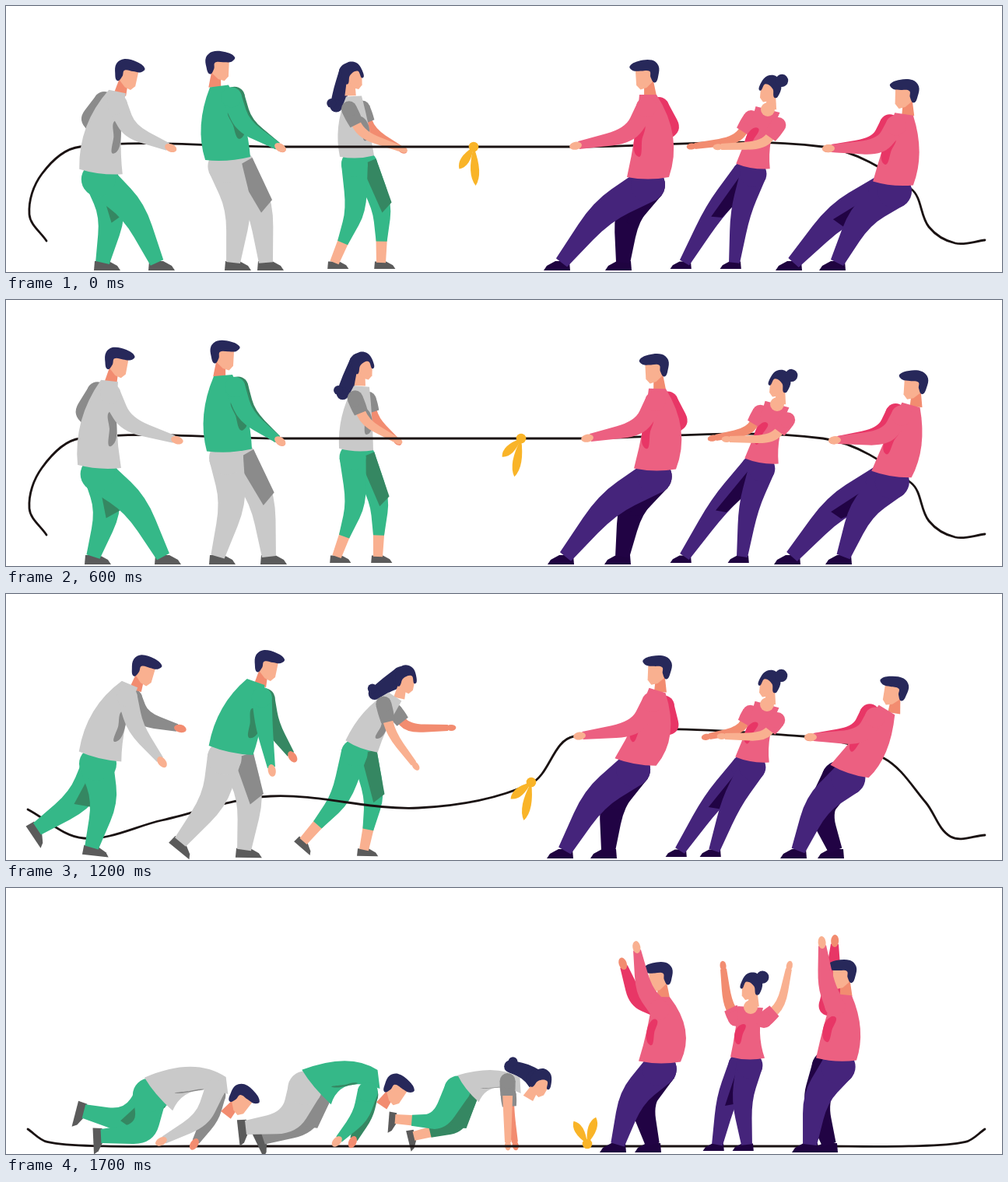
Animation, 1280 px wide and 342 px high, one loop 2.2 s. Source, as an HTML page with a canvas:

```html
<!DOCTYPE html>
<html lang="en">
<head>
<meta charset="utf-8">
<title>Tug of war</title>
<style>
html, body { margin: 0; width: 100%; height: 100%; overflow: hidden; background: #fff; }
canvas { display: block; width: 1280px; height: 342px; }
</style>
</head>
<body>
<canvas id="stage" width="1280" height="342"></canvas>
<script>
const ctx = document.getElementById('stage').getContext('2d');
const LOOP = 2200, GROUND = 330;
const KEYS = [0, 600, 900, 1200, 1400, 1700];
const SKIN = '#f9b090', SKIN_DARK = '#f28c70', HAIR = '#27285a', ROPE = '#1a1212', GOLD = '#f9b428';
const GREEN = '#35b888', GREEN_DARK = '#358762', GRAY = '#c9c9c9', GRAY_DARK = '#8b8b8b';
const PINK = '#ec6081', PINK_DARK = '#e83666', PURPLE = '#45247b', PURPLE_DARK = '#210344';

// ---------- geometry ----------
const mix = (a, b, k) => Array.isArray(a) ? a.map((v, i) => mix(v, b[i], k)) : a + (b - a) * k;
const clamp = v => Math.max(0, Math.min(1, v));
const rad = deg => deg * Math.PI / 180;
const add = (p, v, k = 1) => [p[0] + v[0] * k, p[1] + v[1] * k];
const dist = (p, q) => Math.hypot(q[0] - p[0], q[1] - p[1]) || 1;
const toward = (p, q) => [(q[0] - p[0]) / dist(p, q), (q[1] - p[1]) / dist(p, q)];
const turn = ([x, y]) => [y, -x];
const pairs = flat => flat.flatMap((v, i) => i % 2 ? [] : [[v, flat[i + 1]]]);

function sample(keys, time) {
  let i = KEYS.length - 2;
  while (i && KEYS[i] > time) i--;
  return mix(keys[i], keys[i + 1], (time - KEYS[i]) / (KEYS[i + 1] - KEYS[i]));
}

// ---------- drawing ----------
function fill(color) { ctx.fillStyle = color; ctx.fill(); }

function dot([x, y], r, color) {
  ctx.beginPath();
  ctx.arc(x, y, r, 0, 7);
  fill(color);
}

function polygon(p, color) {
  ctx.beginPath();
  p.forEach(q => ctx.lineTo(...q));
  fill(color);
}

// Smooth line whose handles scale with each chord
function spline(p, closed) {
  const n = p.length;
  const at = i => closed ? p[(i + n) % n] : p[Math.max(0, Math.min(n - 1, i))];
  ctx.beginPath();
  ctx.moveTo(...p[0]);
  for (let i = 0; i < (closed ? n : n - 1); i++) {
    const [a, b, c, d] = [at(i - 1), at(i), at(i + 1), at(i + 2)], reach = dist(b, c) / 3;
    ctx.bezierCurveTo(...add(b, toward(a, c), reach), ...add(c, toward(b, d), -reach), ...c);
  }
}

function blob(p, color) { spline(p, true); fill(color); }

// Quadratic curve from a to c that passes through b
function through(a, b, c) {
  ctx.quadraticCurveTo(2 * b[0] - (a[0] + c[0]) / 2, 2 * b[1] - (a[1] + c[1]) / 2, ...c);
}

// Tapered three-joint shape with a soft bend in the middle
function limb([a, b, c], radii, color) {
  const normals = [turn(toward(a, b)), turn(toward(a, c)), turn(toward(b, c))];
  const side = s => [a, b, c].map((p, i) => add(p, normals[i], s * radii[i]));
  const edge = ([p, q, r]) => {
    ctx.lineTo(...p);
    ctx.lineTo(...mix(p, q, .6));
    ctx.quadraticCurveTo(...q, ...mix(q, r, .4));
    ctx.lineTo(...r);
  };
  ctx.beginPath();
  edge(side(1));
  edge(side(-1).reverse());
  fill(color);
  dot(a, radii[0], color);
}

function local([x, y], deg, dir, size, paint) {
  ctx.save();
  ctx.translate(x, y);
  ctx.rotate(rad(deg));
  ctx.scale(dir * size, size);
  paint();
  ctx.restore();
}

// ---------- body parts ----------
// Elbows sag under level arms and point outward under raised ones.
function elbow(shoulder, wrist) {
  const dx = wrist[0] - shoulder[0];
  const raised = clamp((shoulder[1] - wrist[1]) / 40);
  return add(mix(shoulder, wrist, .4), [dx * mix(-.15, .3, raised), Math.abs(dx) * .2]);
}

function arm([shoulder, bend, wrist], look, skin, sleeve) {
  if (look.woman) {
    limb([shoulder, bend, wrist], [7, 6, 4], skin);
    limb([shoulder, mix(shoulder, bend, .3), mix(shoulder, bend, .6)], [10, 10, 9], sleeve);
  } else {
    limb([shoulder, bend, wrist], [13, 11, 5], sleeve);
  }
  const size = look.woman ? .8 : 1, way = toward(bend, wrist);
  ctx.beginPath();
  ctx.ellipse(...add(wrist, way, 4), 8 * size, 5 * size, Math.atan2(way[1], way[0]), 0, 7);
  fill(skin);
}

// The knee bends forward, further when hip and ankle come close.
function leg(hip, x, lift, look, color, shade) {
  const ankle = [x, GROUND - lift];
  const bend = (look.bend || 14) + Math.max(0, 105 - dist(hip, ankle)) * .9;
  const knee = add(mix(hip, ankle, .45), turn(toward(hip, ankle)), look.dir * bend);
  const heel = Math.atan2(knee[0] - x, ankle[1] - knee[1]) * 180 / Math.PI * clamp(lift / 10);
  local(ankle, heel, look.dir, look.woman ? .8 : 1, () =>
    polygon(pairs([-10, -2, 8, -2, 19, 4, 23, 10, -11, 10]), look.shoe));
  const radii = look.woman ? [17, 13, 7] : [22, 17, 9];
  if (look.cropped) limb([hip, knee, ankle], [12, 9, 6], SKIN);
  limb([hip, knee, look.cropped ? mix(knee, ankle, .62) : ankle], radii, color);
  if (shade) {
    const out = turn(toward(hip, knee));
    polygon([add(hip, out, -4), add(hip, out, radii[0]), add(knee, out, radii[1]),
      add(knee, toward(knee, ankle), 8)], shade);
  }
}

function head(center, deg, look) {
  local(center, deg, look.dir, look.woman ? .9 : 1, () => {
    polygon(pairs([-9, 8, 3, 12, 4, 28, -12, 28]), look.woman ? SKIN : SKIN_DARK);
    polygon(pairs([-8, -8, 13, -8, 13, 13, 8, 19, 0, 17, -8, 10]), SKIN);
    blob(pairs(look.woman
      ? [-12, 10, -16, -6, -8, -19, 5, -19, 13, -9, 14, 3, 7, -7, -4, -1, -7, 11]
      : [-11, 11, -16, 2, -17, -10, -9, -18, 8, -18, 20, -12, 16, -6, 6, -5, -5, -4, -6, 4]), HAIR);
    if (look.bun) dot([-16, -14], 9, HAIR);
  });
}

// Long hair trails behind as the body leans
function hairTail(center, lean) {
  const angle = rad(32 + lean), way = [-Math.sin(angle), Math.cos(angle)];
  const end = add(center, way, 44);
  limb([add(center, [-5, -4]), add(add(center, way, 24), turn(way), -4), end], [13, 10, 8], HAIR);
  dot(end, 8, HAIR);
  dot(add(end, turn(way), -7), 6, HAIR);
}

function torso(neck, hip, front, lean, look) {
  const [neckW, backW, frontW, hemW] = look.build;
  const hem = [Math.cos(rad(lean * .6)) * look.dir, Math.sin(rad(lean * .6)) * look.dir];
  const mid = mix(neck, hip, .5), chest = frontW * Math.cos(rad(lean));
  const [collar, nape] = [add(neck, front, neckW), add(neck, front, -neckW)];
  const [hemFront, hemBack] = [add(hip, hem, hemW), add(hip, hem, -hemW)];
  ctx.beginPath();
  ctx.moveTo(...collar);
  ctx.lineTo(...nape);
  through(nape, add(mid, front, -backW), hemBack);
  ctx.quadraticCurveTo(...add(hip, toward(neck, hip), 5), ...hemFront);
  through(hemFront, add(mid, front, chest), collar);
  fill(look.top);
  blob([[.35, .35], [.5, 1], [.75, .75], [.55, .45]].map(([down, out]) =>
    add(mix(neck, hip, down), front, chest * out)), look.topDark);
  if (look.bun) dot(neck, 9, SKIN);
}

function drawPerson({ look, keys }, step) {
  const time = poseTime(step, look);
  let [neck, hip, hand, feet, farHand, lift] = sample(keys, time);
  if (look.heaves && step > 300 && step < 900) neck = add(neck, [0, -9 * Math.abs(Math.sin(Math.PI * step / 300))]);
  const up = toward(hip, neck), front = turn(up).map(v => -v * look.dir);
  const lean = Math.atan2(up[0], -up[1]) * 180 / Math.PI;
  const shoulder = offset => add(add(neck, up, -16), front, offset);
  const socket = offset => add(add(hip, up, -10), [offset, 0]);

  const [nearS, farS] = look.shoulders.map(shoulder);
  const tucked = [shoulder(-14), add(mix(neck, hip, .42), front, -look.build[1] - 3), mix(neck, hip, .62)];
  arm(time < (look.tuckedUntil || 0) ? tucked : [farS, elbow(farS, farHand), farHand],
    look, SKIN_DARK, look.woman ? look.sleeve : look.topDark);

  const dark = step >= look.darkLegFrom;
  leg(socket(look.spread * .7), feet[1], lift[1], look, dark ? look.pantsDark : look.pants, look.pantsDark);
  leg(socket(look.spread * -.3), feet[0], lift[0], look, look.pants);

  const aim = rad(look.gaze + look.nod * lean);
  const center = add(neck, [Math.sin(aim), -Math.cos(aim)], 26);
  if (look.tail) hairTail(center, lean);
  head(center, lean * .35 + look.gaze * .6, look);
  torso(neck, hip, front, lean, look);
  arm([nearS, elbow(nearS, hand), hand], look, SKIN, look.sleeve || look.top);
}

// ---------- cast ----------
// Feet are x positions of the near and far foot; lift raises them off the ground.
const pose = (neck, hip, hand, feet, farHand = hand, lift = [0, 0]) => [neck, hip, hand, feet, farHand, lift];
const person = (look, ...keys) => ({ look, keys });

const left = { dir: 1, shoe: '#5b5b5b', darkLegFrom: Infinity };
const right = {
  dir: -1, shoe: '#1f0340', darkLegFrom: Infinity,
  top: PINK, topDark: PINK_DARK, pants: PURPLE, pantsDark: PURPLE_DARK
};

// build: half widths of neck, back, chest and hem
const anchor = person({
  ...left, top: GRAY, topDark: GRAY_DARK, pants: GREEN, pantsDark: GREEN_DARK,
  build: [11, 30, 16, 28], shoulders: [3, 10], spread: 4, gaze: 14, nod: 1.45, tuckedUntil: 900
},
  pose([143, 110], [122, 213], [208, 181], [194, 124]),
  pose([133, 104], [120, 214], [216, 179], [202, 112]),
  pose([137, 109], [120, 213], [211, 181], [137, 74], [203, 181], [4, 8]),
  pose([159, 116], [121, 209], [198, 213], [110, 40], [220, 172], [4, 28]),
  pose([193, 163], [124, 221], [167, 268], [85, 38], [207, 252], [9, 33]),
  pose([284, 254], [196, 265], [203, 324], [122, 100], [244, 326], [11, 43]));

const tall = person({
  ...left, top: GREEN, topDark: GREEN_DARK, pants: GRAY, pantsDark: GRAY_DARK, darkLegFrom: 1700,
  build: [12, 29, 26, 29], shoulders: [14, 18], spread: 16, gaze: 8, nod: 1.35, heaves: true
},
  pose([274, 103], [285, 196], [349, 180], [292, 334]),
  pose([279, 97], [287, 193], [349, 179], [272, 338]),
  pose([302, 97], [285, 191], [367, 182], [232, 308], [369, 155], [9, 2]),
  pose([321, 113], [289, 201], [341, 223], [224, 306], [366, 206], [11, 1]),
  pose([383, 168], [310, 206], [324, 247], [238, 328], [387, 249], [22, 3]),
  pose([479, 246], [399, 256], [428, 323], [308, 330], [447, 323], [22, 9]));

const runner = person({
  ...left, top: GRAY, topDark: GRAY_DARK, pants: GREEN, pantsDark: GREEN_DARK, darkLegFrom: 1300,
  woman: true, cropped: true, tail: true, sleeve: GRAY_DARK,
  build: [10, 22, 17, 22], shoulders: [-7, 10], spread: 12, gaze: 0, nod: .95
},
  pose([447, 116], [451, 193], [506, 183], [422, 482]),
  pose([457, 111], [450, 192], [500, 179], [425, 478]),
  pose([489, 121], [459, 194], [554, 181], [396, 463], [566, 166], [8, 0]),
  pose([500, 132], [457, 196], [524, 218], [382, 460], [568, 172], [12, 1]),
  pose([597, 200], [534, 232], [576, 286], [427, 498], [605, 285], [13, 5]),
  pose([661, 254], [594, 258], [645, 327], [500, 524], [654, 327], [33, 11]));

const puller = person({
  ...right, build: [11, 32, 17, 27], shoulders: [2, -3], spread: 0,
  gaze: -6, nod: .5, darkLegFrom: 0, tuckedUntil: 1300
},
  pose([825, 114], [825, 220], [736, 179], [714, 793]),
  pose([837, 114], [834, 217], [751, 177], [719, 792]),
  pose([863, 120], [825, 214], [753, 180], [709, 770]),
  pose([837, 124], [809, 216], [741, 182], [718, 774]),
  pose([832, 125], [825, 219], [749, 172], [765, 814], [772, 160]),
  pose([842, 140], [840, 223], [811, 80], [786, 831], [794, 101]));

const dancer = person({
  ...right, woman: true, bun: true, sleeve: PINK, leads: true,
  build: [16, 14, 18, 22], shoulders: [-18, 18], spread: -10, bend: 6, gaze: 0, nod: .4
},
  pose([979, 133], [960, 206], [919, 181], [936, 872], [885, 180]),
  pose([991, 134], [971, 207], [930, 179], [946, 872], [912, 177]),
  pose([1000, 142], [971, 213], [936, 184], [910, 858], [916, 180]),
  pose([978, 142], [959, 213], [924, 183], [910, 866], [904, 183]),
  pose([949, 142], [949, 215], [1022, 197], [945, 902], [873, 182]),
  pose([957, 153], [953, 218], [1006, 104], [952, 914], [922, 104]));

const backman = person({
  ...right, build: [12, 27, 20, 26], shoulders: [8, 16], spread: -12,
  gaze: -3, nod: .8, darkLegFrom: 1200, leads: true
},
  pose([1154, 139], [1140, 228], [1061, 183], [1068, 1012]),
  pose([1163, 135], [1138, 224], [1069, 180], [1076, 1010]),
  pose([1165, 145], [1117, 227], [1066, 182], [1066, 1006]),
  pose([1132, 149], [1084, 228], [1038, 184], [1018, 1066]),
  pose([1085, 127], [1071, 214], [1007, 140], [1040, 1078], [1029, 174]),
  pose([1075, 137], [1067, 220], [1049, 74], [1033, 1058], [1065, 72]));

// ---------- rope and ribbon ----------
const taut = (knot, y) => pairs([52, 302, 30, 268, 46, 216, 95, y, 350, y, knot, y,
  735, y, 1050, y, 1163, 235, 1186, 284, 1220, 305, 1258, 301]);

// Flat on the ground with both ends curled up
const lying = Array.from({ length: 12 }, (_, i) => {
  const x = 643 - 615 * Math.cos(Math.PI * i / 11);
  return [x, 332 - 22 * Math.exp((Math.abs(x - 643) - 615) / 18)];
});

const rope = [
  taut(601, 181), taut(662, 178), taut(693, 181),
  pairs([28, 277, 100, 314, 200, 291, 340, 260, 530, 275, 674, 244, 730, 183, 1025, 183, 1128, 211, 1182, 268, 1214, 312, 1258, 310]),
  pairs([60, 293, 110, 315, 200, 298, 310, 279, 570, 314, 676, 275, 800, 216, 985, 216, 1095, 237, 1160, 281, 1208, 328, 1258, 322]),
  lying
];

// Knot position, direction of the short end, angle from it to the long end
const ribbon = [
  [601, 181, 123, -36], [662, 178, 136, -36], [693, 181, 143, -36],
  [675, 242, 141, -40], [676, 275, 210, 42], [747, 329, 239, 49]
];

function drawRope(time) {
  spline(sample(rope, time));
  ctx.strokeStyle = ROPE;
  ctx.lineWidth = 2.8;
  ctx.lineCap = 'round';
  ctx.stroke();
}

function drawRibbon(time) {
  const [x, y, angle, spread] = sample(ribbon, time);
  const leaf = (deg, length) => {
    const way = [Math.cos(rad(deg)), Math.sin(rad(deg))];
    const tip = add([x, y], way, length), mid = add([x, y], way, length * .6), out = turn(way);
    ctx.beginPath();
    ctx.moveTo(x, y);
    through([x, y], add(mid, out, 5.5), tip);
    through(tip, add(mid, out, -5.5), [x, y]);
    fill(GOLD);
  };
  leaf(angle, 34);
  leaf(angle + spread, spread < 0 ? 50 : 36);
  dot([x, y], 6.3, GOLD);
}

// ---------- playback ----------
// The rope sways once before it gives way; the rear players move ahead of it.
function poseTime(step, look = {}) {
  if (step >= 600) return step;
  if (look.leads) return Math.min(600, step * 2);
  return step < 300 ? 90 * Math.sin(Math.PI * step / 300) : 2 * (step - 300);
}

function draw(step) {
  ctx.fillStyle = '#fff';
  ctx.fillRect(0, 0, 1280, 342);
  drawPerson(runner, step);
  drawRope(poseTime(step));
  [anchor, tall, puller, dancer, backman].forEach(p => drawPerson(p, step));
  drawRibbon(poseTime(step));
}

const begin = performance.now();
function frame() {
  const now = (performance.now() - begin) % LOOP;
  const beat = now < 1200 ? 150 : 100;
  draw(Math.min(1700, Math.floor(now / beat) * beat));
  requestAnimationFrame(frame);
}
frame();
</script>
</body>
</html>
```
